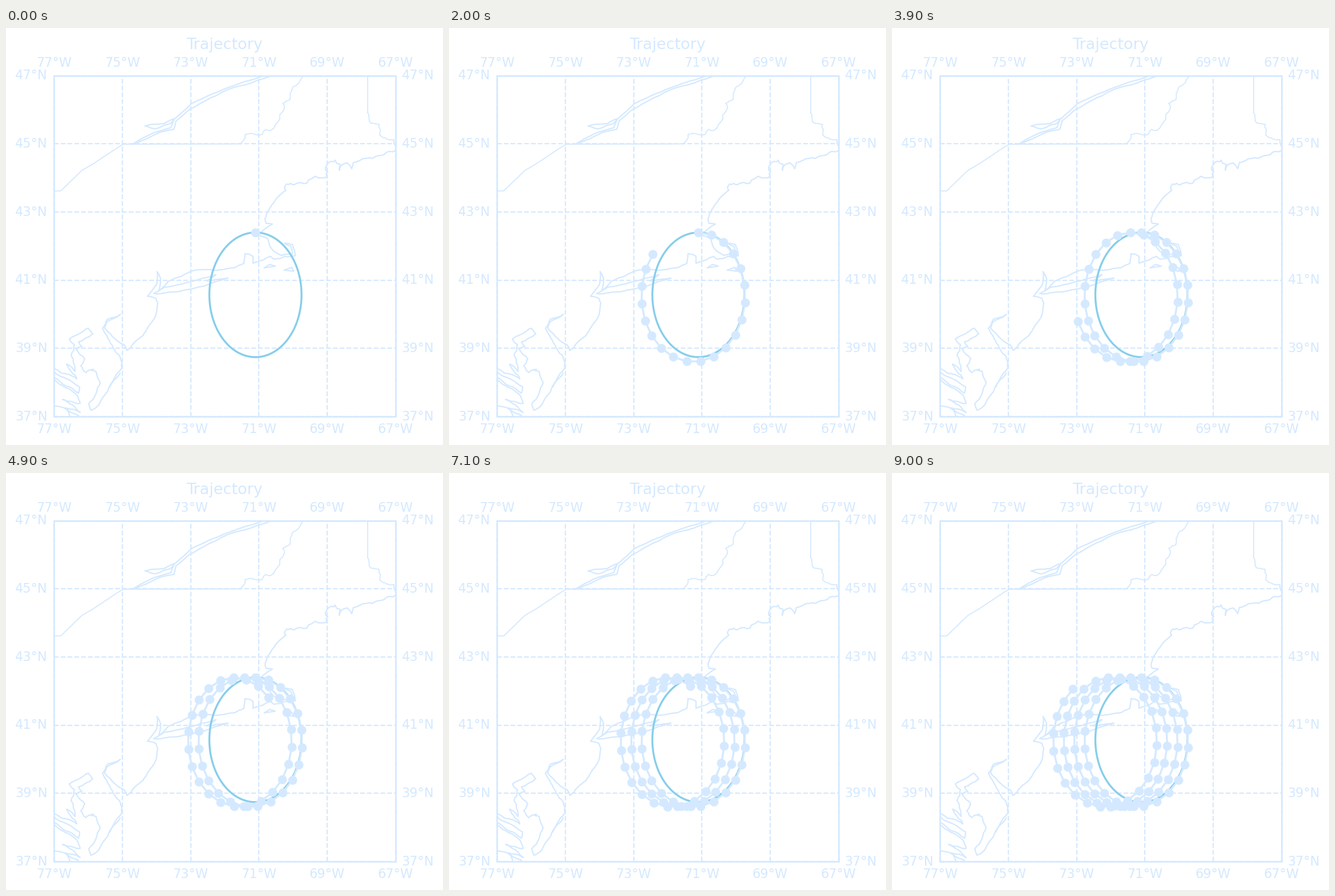
A matplotlib script that plays this animation: 766x732 px, repeating every 9.1 s.

```python
import numpy as np
import matplotlib.pyplot as plt
from matplotlib.animation import FuncAnimation
from matplotlib.patches import Rectangle

W, H, DPI = 766, 732, 162
PALE, SKY = "#d4e9ff", "skyblue"
LEFT, TOP, SIDE = 84.3, 83.8, 598.2
SCALE = SIDE / 10                      # pixels per degree
RIGHT, BOTTOM = LEFT + SIDE, TOP + SIDE
PAD = 5 * DPI / 72                     # gap between frame and labels

OMEGA2, EARTH = 1.4584e-4, 6.371e6     # twice the Earth's spin, radius in m
SPEED, STEP, FRAMES = 20.0, 2880.0, 91
LON0, LAT0 = -71.1, 42.4

rng = np.random.default_rng(4)


def to_px(lon, lat):
    return LEFT + (np.asarray(lon) + 77) * SCALE, TOP + (47 - np.asarray(lat)) * SCALE


def rate(state):
    """Inertial motion on the rotating sphere: heading, lon, lat."""
    turn, _, lat = state
    phi = np.radians(lat)
    move = np.degrees(SPEED / EARTH)
    return np.array([OMEGA2 * np.sin(phi),
                     move * np.cos(turn) * np.cos(phi),
                     -move * np.sin(turn)])


def trajectory(substeps=8):
    state, h = np.array([0.0, LON0, LAT0]), STEP / substeps
    path = [state]
    for _ in range(FRAMES - 1):
        for _ in range(substeps):
            a = rate(state)
            b = rate(state + h / 2 * a)
            c = rate(state + h / 2 * b)
            d = rate(state + h * c)
            state = state + h / 6 * (a + 2 * b + 2 * c + d)
        path.append(state)
    path = np.array(path)
    return to_px(path[:, 1], path[:, 2])


def inertial_circle():
    phi, t = np.radians(LAT0), np.linspace(0, 2 * np.pi, 200)
    r = np.degrees(SPEED / (OMEGA2 * np.sin(phi)) / EARTH)
    return to_px(LON0 + r * np.cos(phi) * np.sin(t), LAT0 - r * (1 - np.cos(t)))


def roughen(points, amount):
    """Split long segments, pushing each midpoint sideways."""
    out = [points[0]]
    for p, q in zip(points, points[1:]):
        d = q - p
        if np.hypot(*d) > 7:
            shift = rng.uniform(-amount, amount)
            mid = (p + q) / 2 + shift * np.array([-d[1], d[0]])
            out += [*roughen([p, mid], amount)[1:], *roughen([mid, q], amount)[1:]]
        else:
            out.append(q)
    return out


def outline(*xy, rough=0.0, lw=1.0):
    points = list(np.array(xy, float).reshape(-1, 2))
    if rough:
        points = roughen(points, rough)
    line, = ax.plot(*zip(*points), color=PALE, lw=lw, solid_joinstyle="round")
    line.set_clip_path(frame)


def draw_borders():
    outline(84, 286, 96, 286, 133, 250, 152, 239, 197, 209, 206, 204, 411, 203.5, lw=0.8)
    outline(411, 203.5, 419, 187, 437, 187, 449, 187, 455, 178, 464, 180, 480, 160,
            480, 152, 488, 141, 485, 132, 498, 125, 502, 105, 520, 83, rough=0.14, lw=0.8)
    outline(633.5, 83, 633.5, 148, lw=0.8)
    outline(633.5, 148, 637, 164, 654, 169, 655, 188, 668, 195, 680, 196, 682, 207,
            rough=0.2, lw=0.8)


def draw_river():
    outline(467, 83, 389, 108, 345, 130, 322, 143, 298, 163, 294, 178, 270, 183,
            221, 204, rough=0.03)
    outline(450, 84, 388, 105, 326, 132, 295, 160, 289, 175, 265, 182, 221, 204, rough=0.03)
    outline(244, 172, 262, 177, 288, 168, 296, 159, 277, 168, 244, 172, rough=0.05)


def draw_north_coast():
    outline(683, 215, 663, 222, 642, 229, 609, 236, 606, 247, 598, 237, rough=0.16)
    outline(598, 237, 584, 250, 577, 232, 564, 238, 564, 252, 555, 263, 530, 267,
            512, 272, 488, 280, 490, 285, rough=0.28)
    outline(490, 285, 468, 308, 454, 335, 456, 343, 467, 344, 455, 352, 441, 362, rough=0.06)


def draw_sound():
    outline(441, 362, 459, 370, 466, 388, 482, 399, 502, 396, 499, 383, 488, 378,
            502, 380, 507, 400, 470, 406, 464, 401, 438, 411, rough=0.08)
    outline(438, 411, 433, 413, 433, 401, 426, 397, 419, 396, 417, 413, 400, 421,
            328, 426, 284, 445, 268, 461, 271, 440, 265, 428, rough=0.05)
    outline(453, 421, 462, 415, 472, 418, 453, 421)
    outline(488, 425, 501, 420, 504, 427, 488, 425)
    outline(259, 466, 278, 455, 320, 446, 368, 433, 352, 444, 389, 439, 350, 452,
            300, 463, 262, 467, rough=0.03)


def draw_south_coast():
    outline(265, 428, 264, 450, 248, 471, 263, 475, 266, 483, 260, 510, 240, 540,
            212, 566, 207, 556, 186, 541, 173, 527, 177, 516, 200, 503, rough=0.07)
    outline(200, 503, 178, 511, 169, 527, 188, 562, 200, 577, 203, 597, 178, 638,
            163, 661, 149, 671, 145, 660, 165, 622, 158, 603, 150, 601, rough=0.08)
    outline(200, 606, 182, 630, rough=0.06)


def draw_bay():
    outline(153, 599, 140, 605, 131, 593, 138, 581, 123, 564, 133, 559, 127, 551,
            152, 537, 144, 527, 128, 537, 111, 546, 120, 556, 114, 575, 121, 603,
            106, 590, 124, 616, 96, 605, 84, 597, rough=0.12)
    outline(84, 603, 107, 616, 129, 630, 127, 641, 84, 613, rough=0.08)
    outline(84, 617, 124, 644, 130, 659, 99, 652, 130, 675, 104, 667, 127, 680, rough=0.08)
    outline(84, 663, 107, 670, 112, 682, rough=0.08)


def label(x, y, text, ha, va, size=10):
    ax.text(x, y, text, color=PALE, fontsize=size, family="DejaVu Sans", ha=ha, va=va)


def draw_grid():
    for deg in range(0, 11, 2):
        x, y = LEFT + deg * SCALE, TOP + deg * SCALE
        ax.plot([x, x], [BOTTOM, TOP], "--", color=PALE, lw=1)
        ax.plot([LEFT, RIGHT], [y, y], "--", color=PALE, lw=1)
        lon, lat = f"{77 - deg}°W", f"{47 - deg}°N"
        label(x, TOP - PAD, lon, "center", "bottom")
        label(x, BOTTOM + PAD, lon, "center", "top")
        label(LEFT - PAD, y, lat, "right", "center")
        label(RIGHT + PAD, y, lat, "left", "center")


fig = plt.figure(figsize=((W + .01) / DPI, (H + .01) / DPI), dpi=DPI, facecolor="white")
ax = fig.add_axes([0, 0, 1, 1])
ax.set(xlim=(0, W), ylim=(H, 0))
ax.axis("off")

frame = Rectangle((LEFT, TOP), SIDE, SIDE, fill=False, ec=PALE, lw=1.2)
ax.add_patch(frame)
draw_borders()
draw_river()
draw_north_coast()
draw_sound()
draw_south_coast()
draw_bay()
draw_grid()
label((LEFT + RIGHT) / 2, 36.7, "Trajectory", "center", "baseline", 12)

ax.plot(*inertial_circle(), color=SKY, lw=1.5, zorder=4)
xs, ys = trajectory()
track, = ax.plot([], [], "o-", color=PALE, lw=1.5, ms=6, zorder=5)


def update(i):
    track.set_data(xs[:i + 1], ys[:i + 1])
    return track,


anim = FuncAnimation(fig, update, frames=FRAMES, interval=100, repeat=True, repeat_delay=0)
plt.show()
```
